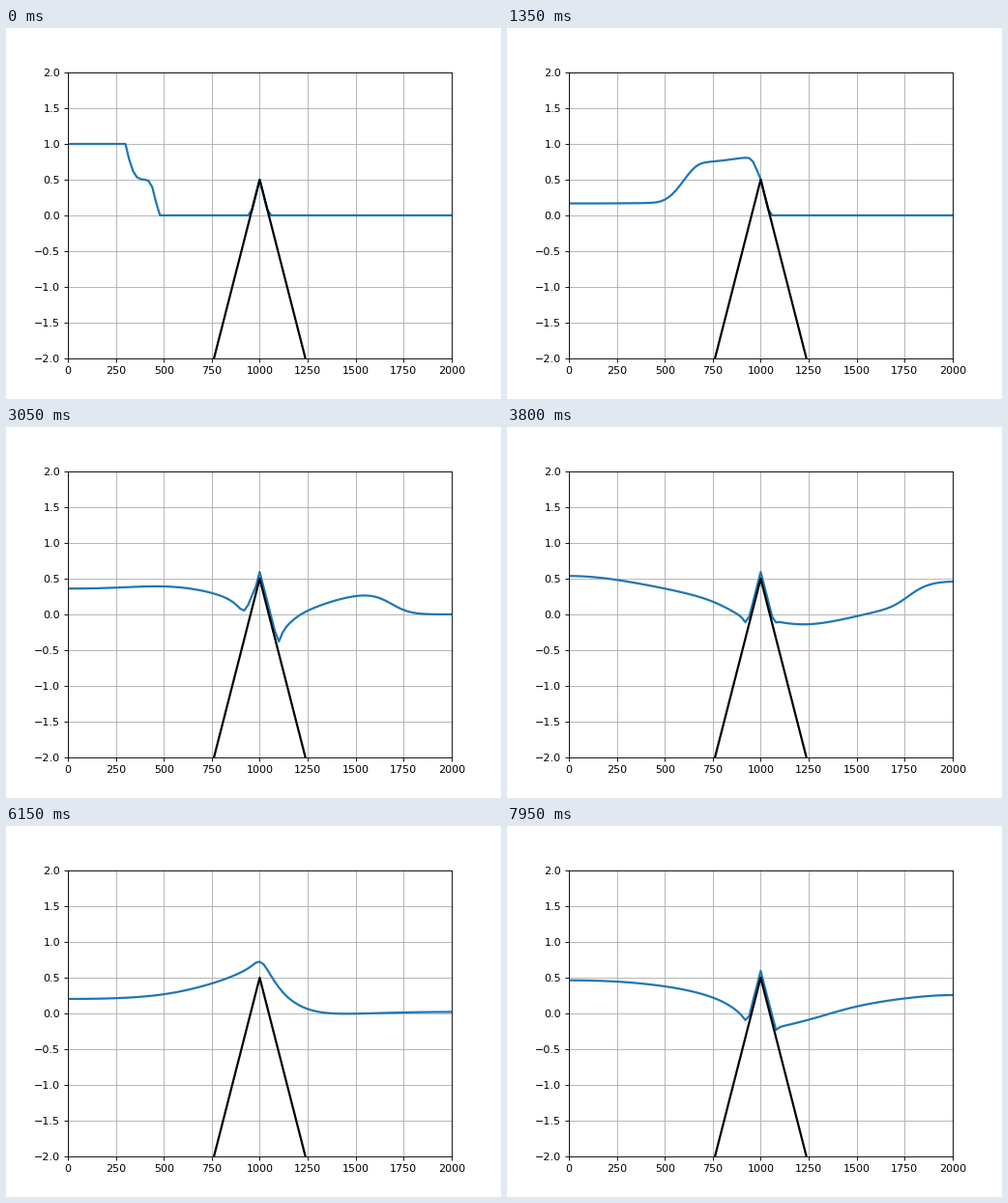
These frames come from a looping animation (512 by 384 pixels, 8000 ms). A matplotlib script:

```python
import numpy as np
import matplotlib.pyplot as plt
from matplotlib.animation import FuncAnimation

# Shallow water: a raised block of water runs over a triangular ridge.
G = 9.81
DX, DT = 20.0, 2.0
STEPS_PER_FRAME = 2
FRAMES, INTERVAL = 160, 50
WARMUP = 4          # steps before the first picture
H_MIN = 0.1         # thinner layers stay put

x = np.arange(0, 2000 + DX, DX)
bed = 0.5 - 0.0105 * np.abs(x - 1000)


def pad(a, sign=1):
    """Add a mirrored cell at each wall."""
    return np.concatenate(([sign * a[0]], a, [sign * a[-1]]))


def step(h, q):
    """One finite-volume step (HLL flux, hydrostatic reconstruction)."""
    u = np.where(h > H_MIN, q / np.maximum(h, H_MIN), 0)
    hp, bp, up = pad(h), pad(bed), pad(u, -1)
    h0, h1, u0, u1 = hp[:-1], hp[1:], up[:-1], up[1:]

    sill = np.maximum(bp[:-1], bp[1:])
    hl = np.maximum(h0 + bp[:-1] - sill, 0)
    hr = np.maximum(h1 + bp[1:] - sill, 0)
    cl, cr = np.sqrt(G * hl), np.sqrt(G * hr)
    sl = np.minimum(np.minimum(u0 - cl, u1 - cr), 0)
    sr = np.maximum(np.maximum(u0 + cl, u1 + cr), 0)
    span = np.maximum(sr - sl, 1e-9)

    def hll(fl, fr, jump):
        return (sr * fl - sl * fr + sl * sr * jump) / span

    mass = hll(hl * u0, hr * u1, hr - hl)
    push = hll(hl * u0**2 + G * hl**2 / 2,
               hr * u1**2 + G * hr**2 / 2,
               hr * u1 - hl * u0)
    stuck = ((mass > 0) & (h0 < H_MIN)) | ((mass < 0) & (h1 < H_MIN))
    mass[stuck] = 0

    push_l = push + G / 2 * (h0**2 - hl**2)
    push_r = push + G / 2 * (h1**2 - hr**2)
    h = np.maximum(h - DT / DX * (mass[1:] - mass[:-1]), 0)
    q = q - DT / DX * (push_l[1:] - push_r[:-1])
    return h, np.where(h > H_MIN, q, 0)


def simulate():
    """Water level for every frame."""
    h = np.maximum(np.where(x < 400, 1.0, 0.0) - bed, 0)
    q = np.zeros_like(x)
    for _ in range(WARMUP):
        h, q = step(h, q)
    levels = []
    for _ in range(FRAMES):
        levels.append(bed + h)
        for _ in range(STEPS_PER_FRAME):
            h, q = step(h, q)
    return levels


levels = simulate()

fig, ax = plt.subplots(figsize=(6.4, 4.8), dpi=80)
water, = ax.plot(x, levels[0], color="tab:blue", lw=2)
ax.plot(x, bed, color="black", lw=2)
ax.set_xlim(0, 2000)
ax.set_ylim(-2, 2)
ax.grid(True)


def draw(frame):
    water.set_ydata(levels[frame])
    return water,


anim = FuncAnimation(fig, draw, frames=FRAMES, interval=INTERVAL,
                     repeat=True, repeat_delay=0)
plt.show()
```
